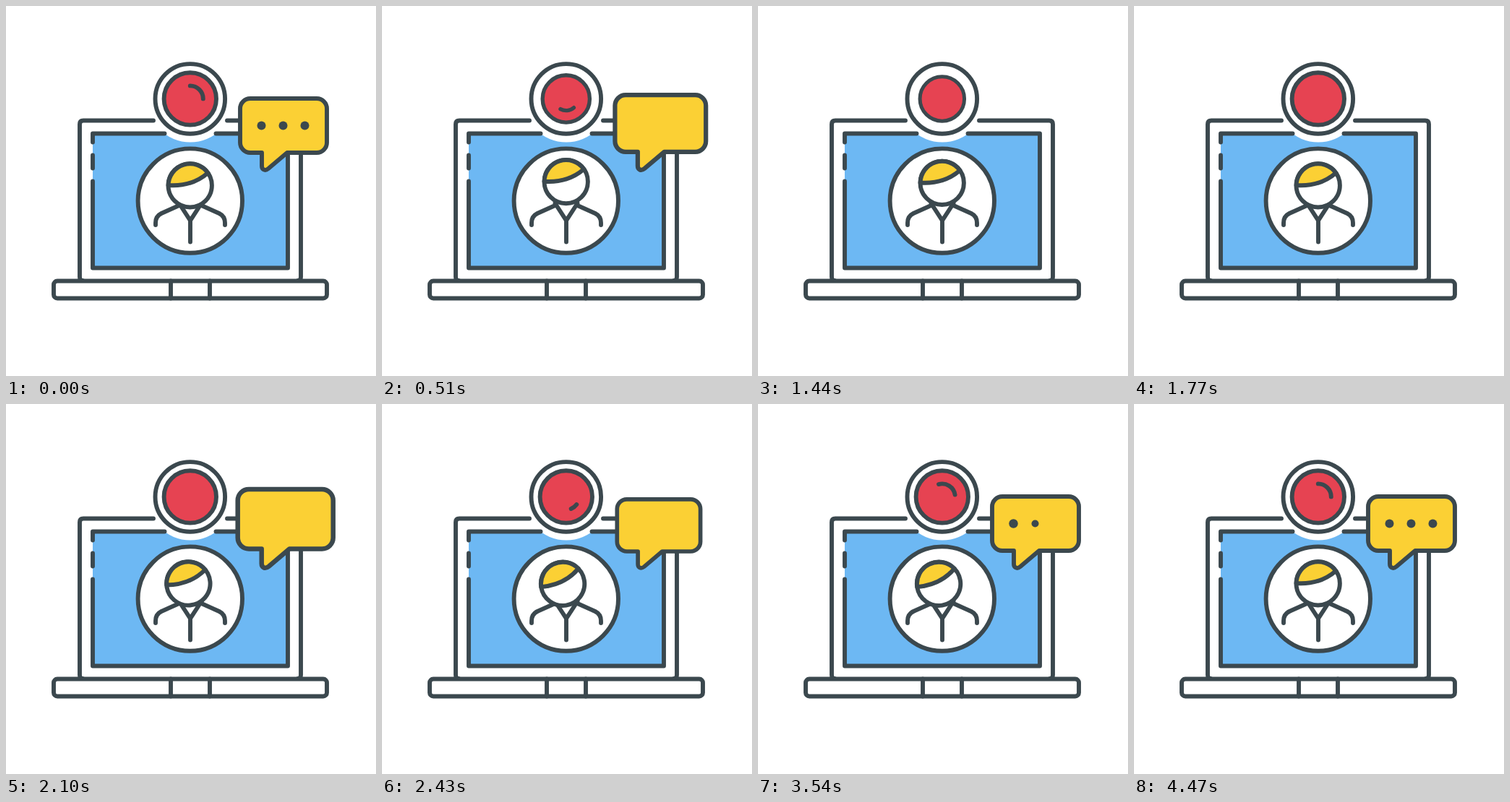
An HTML page for the animation above (4.5 s loop, 512x512 px).

```html
<!DOCTYPE html>
<html lang="en">
<head>
<meta charset="utf-8">
<title>Video call</title>
<style>
  html, body { margin: 0; width: 100%; height: 100%; overflow: hidden; background: #fff; }
  svg { display: block; width: 100vw; height: 100vh; }
  .line { fill: none; stroke: #3b484e; stroke-width: 5.9; stroke-linecap: round; stroke-linejoin: round; }
  .white { fill: #fff; }
  .yellow { fill: #fbd034; }
  .red { fill: #e64352; }
  .dot { fill: #3b484e; }
</style>
</head>
<body>
<svg viewBox="0 0 512 512">
  <!-- laptop -->
  <rect x="120" y="176.5" width="270" height="186" fill="#6db8f3"/>
  <circle class="white" cx="255" cy="128.5" r="60"/>
  <path class="line" d="M204 158.5H107q-5 0-5 5V375q0 5 4 5M306 158.5H403q5 0 5 5V375q0 5-4 5"/>
  <path class="line" d="M219.500 176.500H120V188.500M120 206.500V224.500M120 242.500V362.500H390V176.500H290.500"/>
  <rect class="line white" x="66" y="380.500" width="378" height="24" rx="5"/>
  <path class="line" d="M228 380.500V404.500M282 380.500V404.500"/>

  <!-- webcam -->
  <circle class="line white" cx="254.800" cy="128.400" r="48.300"/>
  <g id="lens">
    <circle class="line red" r="36.200"/>
    <path class="line" id="glint"/>
  </g>

  <!-- person -->
  <circle class="line white" cx="254.800" cy="269.600" r="72.200"/>
  <path class="line" d="M207 303v-3q0-9 8-13L239.500 276M303 303v-3q0-9-8-13L270.500 276"/>
  <path class="line" d="M239.500 273L255 297L270.500 273M255 297V326.500"/>
  <g id="head">
    <circle class="line white" cx="254.700" cy="248.300" r="30.200"/>
    <path class="line yellow" d="M224.600 248A30.200 30.200 0 0 1 279.400 231C265 243.500 246 249.500 224.600 248Z"/>
  </g>

  <!-- speech bubble -->
  <g id="bubble">
    <path class="line yellow" d="M338 128H430a14 14 0 0 1 14 14V189a14 14 0 0 1-14 14H389L363 225C358 229 354 226 354 221.500V203H338a14 14 0 0 1-14-14V142a14 14 0 0 1 14-14Z"/>
    <circle class="dot" cx="353.500" cy="165.500"/>
    <circle class="dot" cx="383.500" cy="165.500"/>
    <circle class="dot" cx="413.500" cy="165.500"/>
  </g>
</svg>
<script>
const LOOP = 4500, STEP = 30;
const byId = id => document.getElementById(id);
const lens = byId('lens'), glint = byId('glint'), head = byId('head'), bubble = byId('bubble');
const dots = document.querySelectorAll('.dot');

// Progress from 0 to 1 between two times: plain, eased at both ends, or popping past 1.
const part = (t, a, b) => Math.min(1, Math.max(0, (t - a) / (b - a)));
const ramp = (t, a, b) => { const u = part(t, a, b); return u * u * (3 - 2 * u); };
const pop = (t, a) => { const v = part(t, a, a + 270) - 1; return 1 + 2.7 * v ** 3 + 1.7 * v ** 2; };

// Both ends of the glint in degrees, clockwise from the right.
function glintAngles(t) {
  if (t < 1500) {
    const u = part(t, 0, 720);
    return [270 + 220 * u ** 1.33, 360 + 130 * (1 - (1 - u) ** 2)];
  }
  return [22 + 248 * ramp(t, 2200, 3780), 22 + 338 * ramp(t, 2050, 3700)];
}

function arc(from, to, r) {
  const at = deg => {
    const a = deg * Math.PI / 180;
    return `${r * Math.cos(a)} ${r * Math.sin(a)}`;
  };
  return to - from > 1 ? `M${at(from)}A${r} ${r} 0 0 1 ${at(to)}` : '';
}

function dotRadius(t, i) {
  const shown = 1 - ramp(t, 75 * i, 75 * i + 270)
    + pop(t, 2720 + 150 * i) - ramp(t, 3200, 3290)
    + pop(t, 3320 + 150 * i);
  return 6 * Math.max(0, shown);
}

function draw(t) {
  const shrink = ramp(t, 210, 900) - ramp(t, 1200, 1770);
  lens.setAttribute('transform', `translate(254.8 128.4) scale(${1 - 0.244 * shrink})`);
  glint.setAttribute('d', arc(...glintAngles(t), 18));

  const lift = ramp(t, 0, 600) - ramp(t, 1200, 1780);
  const tilt = ramp(t, 1800, 2400) - ramp(t, 3900, 4500);
  head.setAttribute('transform', `translate(0 ${-5.6 * lift}) rotate(${-9 * tilt} 255 278)`);

  const size = 1 + 0.05 * ramp(t, 270, 540) - 1.05 * ramp(t, 540, 900)
    + 1.1 * ramp(t, 1800, 2100) - 0.14 * ramp(t, 2100, 2400) + 0.04 * ramp(t, 2400, 2700);
  bubble.style.display = size > 0.01 ? '' : 'none';
  bubble.setAttribute('transform', `translate(357 228) scale(${size}) translate(-357 -228)`);
  dots.forEach((dot, i) => dot.setAttribute('r', dotRadius(t, i)));
}

const start = performance.now();
function tick() {
  const t = (performance.now() - start) % LOOP;
  draw(Math.floor(t / STEP) * STEP);
  requestAnimationFrame(tick);
}
tick();
</script>
</body>
</html>
```
